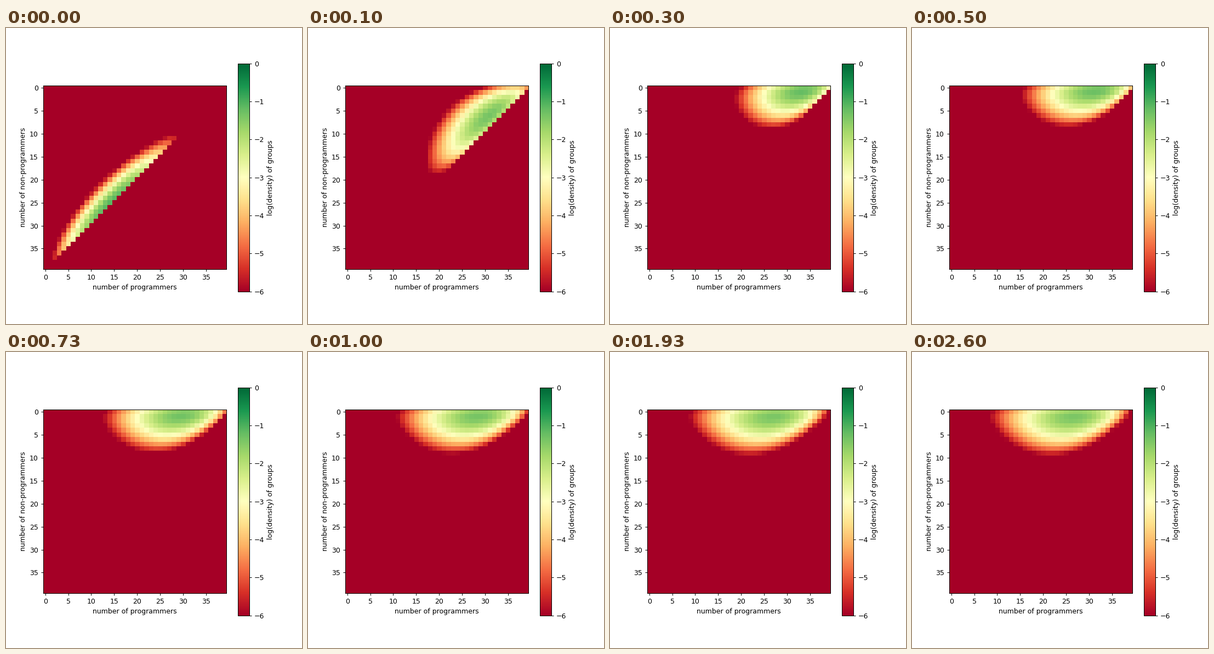
Animation of 540 by 540 pixels, one loop 8 s. Source, as a matplotlib script:

```python
import math

import numpy as np
import matplotlib.pyplot as plt
from matplotlib.animation import FuncAnimation

CAPACITY = 39                 # largest group
FLOOR = -6                    # lowest log density shown
LOOP, INTERVAL = 8000, 32     # ms
STEPS_PER_MS = 0.03

VACANT_START, VACANT_END = 0.55, 11.5
NON_START, NON_END = 24.5, 1.6
NON_DIP = 1.1                 # shortfall while groups are still crowded
VACANT_RATE, NON_RATE = 0.066, 0.479

counts = np.arange(CAPACITY + 1)
log_fact = np.cumsum(np.log10(np.maximum(counts, 1)))
non, prog = np.meshgrid(counts, counts, indexing="ij")
fits = non + prog <= CAPACITY
total = np.minimum(non + prog, CAPACITY)
vacant = CAPACITY - total


def means(step):
    """Mean number of vacancies and of non-programmers per group."""
    slow = math.exp(-VACANT_RATE * step)
    fast = math.exp(-NON_RATE * step)
    free = VACANT_END + (VACANT_START - VACANT_END) * slow
    others = NON_END - NON_DIP * slow + (NON_START - NON_END + NON_DIP) * fast
    return free, others


def density(step):
    """Poisson vacancies, binomial split of the members, as log10."""
    free, others = means(step)
    share = others / (CAPACITY - free)
    log_size = vacant * math.log10(free) - free / math.log(10) - log_fact[vacant]
    log_split = (log_fact[total] - log_fact[prog] - log_fact[non]
                 + non * math.log10(share) + prog * math.log10(1 - share))
    return np.where(fits, np.maximum(log_size + log_split, FLOOR), FLOOR)


fig, ax = plt.subplots(figsize=(6, 6), dpi=90)
image = ax.imshow(density(0), cmap="RdYlGn", vmin=FLOOR, vmax=0)
ax.set_xlabel("number of programmers")
ax.set_ylabel("number of non-programmers")
fig.colorbar(image, label="log(density) of groups")


def update(frame):
    image.set_data(density(math.ceil(frame * INTERVAL * STEPS_PER_MS)))
    return [image]


anim = FuncAnimation(fig, update, frames=LOOP // INTERVAL, interval=INTERVAL,
                     repeat=True, repeat_delay=0)
plt.show()
```
